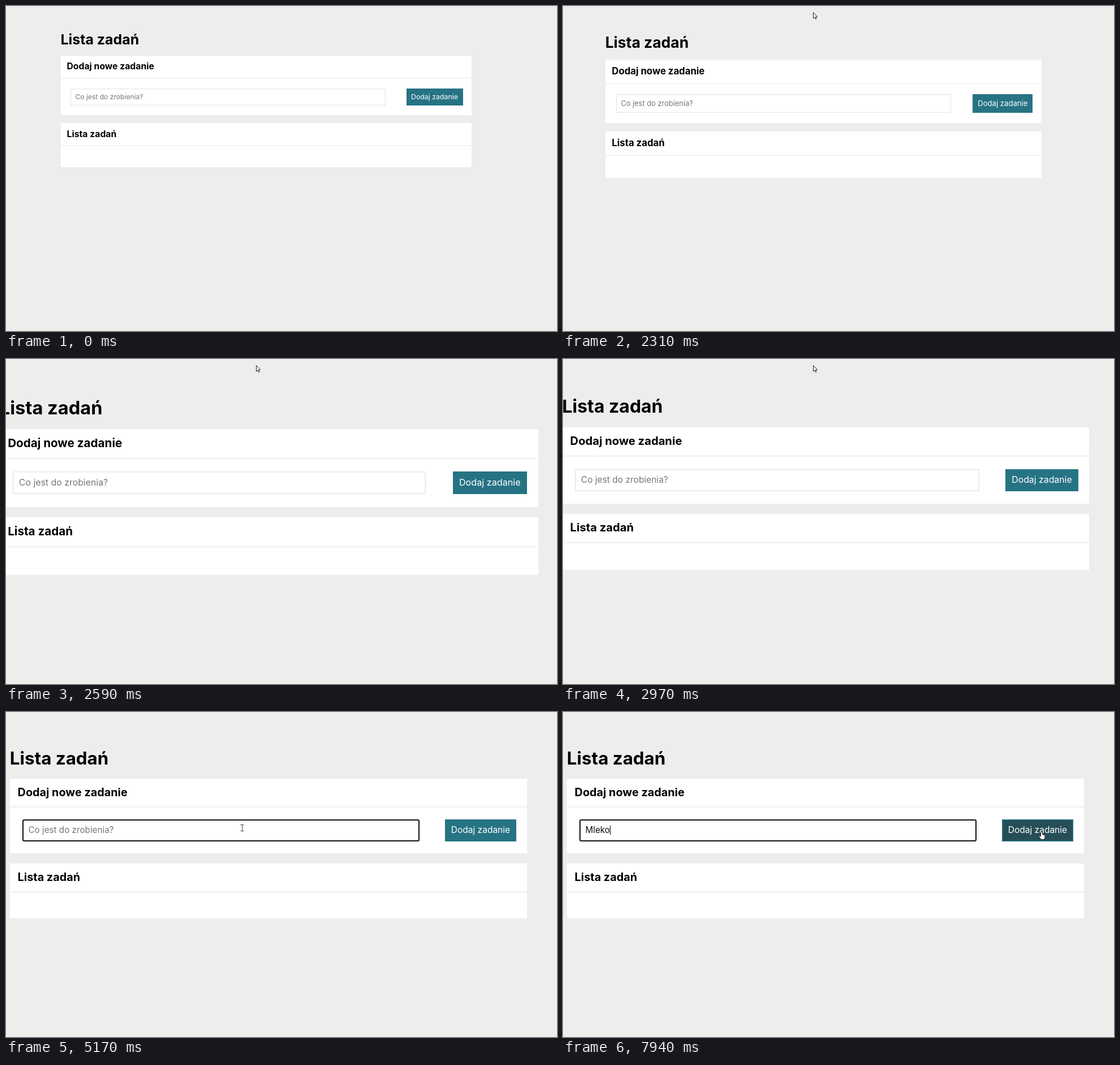
An HTML page with a canvas for the animation above (8 s loop, 974x575 px).

```html
<!DOCTYPE html>
<html lang="pl">
<head>
<meta charset="utf-8">
<title>Lista zadań</title>
<style>
  html, body { margin: 0; width: 100%; height: 100%; overflow: hidden; background: #ededec; }
  canvas { display: block; }
</style>
</head>
<body>
<canvas id="stage" width="974" height="575"></canvas>
<script>
const ctx = document.getElementById("stage").getContext("2d");
const LOOP = 8000;
const ANCHOR = { x: 443, y: -28 };
const FONT = 'Inter, "Open Sans", sans-serif';
const TEAL = "#267384";
const INPUT = { x: 114.3, y: 145.5, r: 671.4, b: 176 };
const BUTTON = { x: 707.5, y: 145.5, r: 807.5, b: 176 };

const POINTER_IN = 520;
const FOCUS_AT = 4650;
const BLINK = 520;
const WORD = "Mleko";
const TYPE_AT = 5900;
const KEY_GAP = 200;

const linear = p => p;
const easeOut = p => 1 - (1 - p) ** 2;
const smooth = p => p * p * (3 - 2 * p);
const clamp = (v, low, high) => Math.min(high, Math.max(low, v));
const ramp = (t, from, to, ease = linear) => ease(clamp((t - from) / (to - from), 0, 1));

// Pinch in, drift back a little, then settle.
const zoomAt = t => 1
  + 0.311 * ramp(t, 2240, 2590)
  - 0.041 * ramp(t, 2820, 3040)
  - 0.011 * ramp(t, 3120, 3380);

function pointerAt(t) {
  const enter = ramp(t, 510, 780, easeOut);
  const rise = ramp(t, 1040, 1810, smooth);
  const drop = ramp(t, 3780, 4630, smooth);
  const reach = ramp(t, 7700, 7940, easeOut);
  return {
    x: 821 - 336 * enter - 43 * rise - 24.5 * drop - 14 * Math.sin(Math.PI * drop) + 429 * reach,
    y: 487 - 381 * enter - 95 * rise + 194 * drop + 7 * reach
  };
}

let zoom = 1;
const sx = x => ANCHOR.x + (x - ANCHOR.x) * zoom;
const sy = y => ANCHOR.y + (y - ANCHOR.y) * zoom;

// Page box to stage pixels, with crisp edges.
function pixels({ x, y, r, b }) {
  const left = Math.round(sx(x)), top = Math.round(sy(y));
  return [left, top, Math.round(sx(r)) - left, Math.round(sy(b)) - top];
}

function fillBox(box, color) {
  ctx.fillStyle = color;
  ctx.fillRect(...pixels(box));
}

function strokeBox(box, color, width, radius = 0) {
  const [x, y, w, h] = pixels(box);
  ctx.strokeStyle = color;
  ctx.lineWidth = width;
  ctx.beginPath();
  ctx.roundRect(x + width / 2, y + width / 2, w - width, h - width, radius);
  ctx.stroke();
}

function text(str, x, y, size, weight, color) {
  ctx.font = `${weight} ${size * zoom}px ${FONT}`;
  ctx.fillStyle = color;
  ctx.fillText(str, sx(x), sy(y));
  return ctx.measureText(str).width;
}

function panel(title, top, bottom) {
  fillBox({ x: 97, y: top, r: 822.5, b: bottom }, "#fff");
  ctx.fillStyle = "#e9ebea";
  ctx.fillRect(sx(97), sy(top + 39), 725.5 * zoom, 1.2 * zoom);
  text(title, 107.5, top + 24.3, 15.75, 700, "#000");
}

function field(t) {
  const focused = t >= FOCUS_AT;
  if (focused) strokeBox(INPUT, "#111", 2, 2);
  else strokeBox(INPUT, "#e5e8e7", 1.2 * zoom);

  const count = clamp(Math.floor((t - TYPE_AT) / KEY_GAP) + 1, 0, WORD.length);
  const label = count ? WORD.slice(0, count) : "Co jest do zrobienia?";
  const width = text(label, 122.5, 164.5, 12.1, 400, count ? "#111" : "#777");

  const since = count ? TYPE_AT + (count - 1) * KEY_GAP : FOCUS_AT;
  if (focused && Math.floor((t - since) / BLINK) % 2 === 0) {
    ctx.fillStyle = "#000";
    ctx.fillRect(Math.round(sx(122.5) + (count ? width : 0)), sy(154), 1, 12.6 * zoom);
  }
}

function button(hover) {
  fillBox(BUTTON, hover ? "#264e57" : TEAL);
  if (hover) strokeBox(BUTTON, TEAL, 1.5);
  text("Dodaj zadanie", 716, 164.5, 12.35, 400, "#fff");
}

const inside = (box, { x, y }) =>
  x > sx(box.x) && x < sx(box.r) && y > sy(box.y) && y < sy(box.b);

const ARROW = new Path2D("M.5 .5V10.8L3 8.7L4.5 12.3L6 11.6L4.6 8.1H7.6Z");
const HAND = new Path2D("M-2 7V1Q-.5-1 1 1V4.5L5 6Q6 7 5.5 9L4.5 13.5H-1.5L-5 8.5Q-4.5 6-2 8Z");
const BEAM = new Path2D("M-3-5.5H3M0-5.5V5.5M-3 5.5H3");

function pointer(at) {
  const beam = inside(INPUT, at);
  const path = beam ? BEAM : inside(BUTTON, at) ? HAND : ARROW;
  ctx.save();
  ctx.translate(at.x, at.y);
  ctx.lineJoin = "round";
  ctx.lineWidth = 1;
  ctx.fillStyle = "#fff";
  ctx.strokeStyle = beam ? "#444" : "#222";
  if (!beam) ctx.fill(path);
  ctx.stroke(path);
  ctx.restore();
}

function draw(t) {
  zoom = zoomAt(t);
  const at = pointerAt(t);
  ctx.fillStyle = "#ededec";
  ctx.fillRect(0, 0, 974, 575);
  text("Lista zadań", 96.5, 68, 24.9, 700, "#000");
  panel("Dodaj nowe zadanie", 88, 193);
  panel("Lista zadań", 207.3, 284.5);
  field(t);
  button(inside(BUTTON, at));
  if (t >= POINTER_IN) pointer(at);
}

const start = performance.now();
function tick() {
  draw((performance.now() - start) % LOOP);
  requestAnimationFrame(tick);
}
tick();
</script>
</body>
</html>
```
